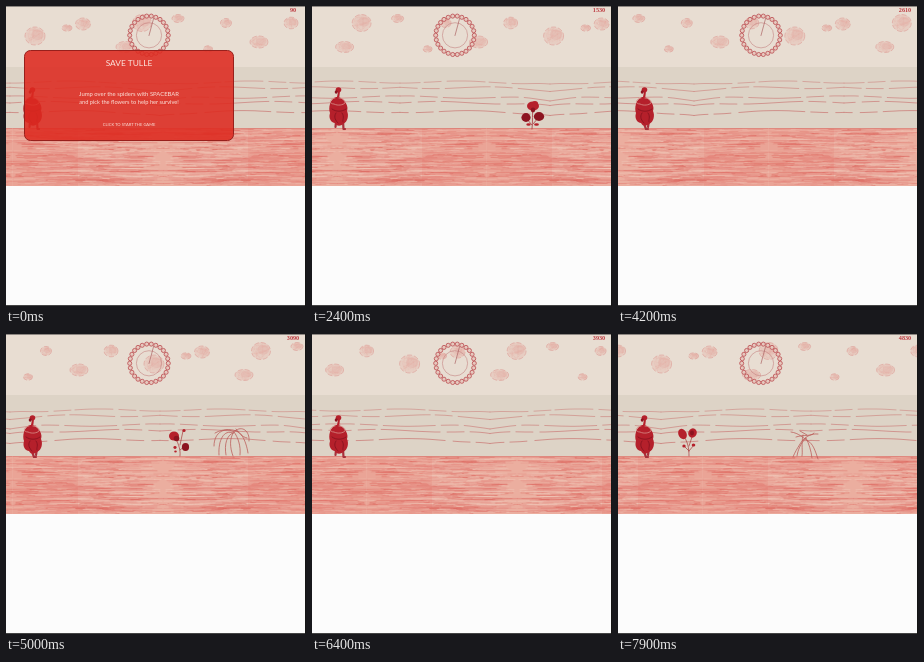
An HTML page that plays this animation: 300 by 300 pixels, repeating every 8000 ms.

```html
<!DOCTYPE html>
<html lang="en">
<head>
<meta charset="utf-8">
<title>Flower runner</title>
<style>
html, body { margin: 0; width: 100%; height: 100%; overflow: hidden; background: #fcfcfc; }
svg { display: block; width: 100vw; height: 100vh; }
.ink { fill: none; stroke-linecap: round; stroke-linejoin: round; }
.note { fill: #fbe3dc; font-family: Lato, "Open Sans", sans-serif; text-anchor: middle; }
</style>
</head>
<body>
<svg viewBox="0 0 300 300">
  <rect width="300" height="62" fill="#e8ddd2"/>
  <rect y="61" width="300" height="62" fill="#ddd3c6"/>
  <g id="clouds"></g>
  <g id="clock"></g>
  <g id="wires"></g>
  <g id="ground"></g>
  <g id="world"></g>
  <g id="woman"></g>
  <g id="panel">
    <rect x="18.5" y="44.5" width="209" height="90" rx="6" fill="#de2a20" fill-opacity=".87" stroke="#98201c"/>
    <g class="note">
      <text x="123" y="60" font-size="8.4">SAVE TULLE</text>
      <text x="123" y="90" font-size="5.9">Jump over the spiders with SPACEBAR</text>
      <text x="123" y="98" font-size="5.7">and pick the flowers to help her survive!</text>
      <text x="123" y="120" font-size="4.1">CLICK TO START THE GAME</text>
    </g>
  </g>
  <text id="score" x="287" y="6.4" font-size="6.2" font-weight="bold" text-anchor="middle" fill="#bd3a40" font-family="Liberation Serif, serif"></text>
  <rect y="180" width="300" height="120" fill="#fcfcfc"/>
  <path d="M0 .5H300" stroke="#8d8782"/>
  <path d="M0 299.5H300" stroke="#444"/>
  <path d="M299.5 0V300" stroke="#151515"/>
</svg>
<script>
const LOOP = 8000, STEP = 100, SPEED = 0.18;
const CLOUD_PERIOD = 299, TILE = 300;
const byId = id => document.getElementById(id);

let seed = 7;
const rand = (lo = 0, hi = 1) => {
  seed = (seed * 16807) % 2147483647;
  return lo + (hi - lo) * seed / 2147483647;
};
const ink = (d, color, width, extra = '') =>
  `<path class="ink" d="${d}" stroke="${color}" stroke-width="${width}" ${extra}/>`;
const blob = (x, y, rx, ry, fill, extra = '') =>
  `<ellipse cx="${x}" cy="${y}" rx="${rx}" ry="${ry}" fill="${fill}" ${extra}/>`;
const mirrored = (axis, half) =>
  `<g transform="translate(${axis})">${half}<g transform="scale(-1 1)">${half}</g></g>`;

// Repeats a strip so that it can scroll without a gap.
function fillStrip(id, markup, period) {
  const copies = [-1, 0, 1, 2].map(i => `<use href="#${id}Tile" x="${i * period}"/>`).join('');
  byId(id).innerHTML = `<defs><g id="${id}Tile">${markup}</g></defs>${copies}`;
}

function cloud([x, y, rx, ry]) {
  let scribble = '';
  for (let i = 0; i < 30; i++) {
    const a = rand(0, 6.28), r = rand(0.6, 1);
    scribble += `${i ? 'L' : 'M'}${(x + rx * r * Math.cos(a)).toFixed(1)} ${(y + ry * r * Math.sin(a)).toFixed(1)}`;
  }
  return blob(x, y, rx, ry, '#e6aaa2', 'fill-opacity=".32" stroke="#dd9d96" stroke-width=".6" stroke-dasharray="5 2"') +
    blob(x + rx * 0.25, y - ry * 0.15, rx * 0.6, ry * 0.6, '#df938c', 'opacity=".22"') +
    ink(scribble, '#e0a098', 0.4, 'opacity=".28"');
}

const clouds = [
  [29, 30, 10, 9], [61, 22, 5, 3.2], [77, 18, 7.5, 6], [119, 41, 9, 5.5], [136, 17, 9.5, 8.5],
  [172, 12.5, 6, 4], [202, 43, 4.5, 3.2], [220, 17, 5.5, 4.5], [253, 36, 9, 6], [285, 17, 7, 5.8]
];

// Wires are mirrored about one axis, where they sag.
function wires() {
  let half = '';
  [[76, 2], [81.5, 4], [91, 4], [96.5, 3], [105.5, 4]].forEach(([base, sag], n) => {
    let d = '';
    for (let x = 0; x <= 150; x += 5) {
      const y = base + sag * Math.exp(-x / 26) + 1.1 * Math.sin(x / 19 + n * 1.7) * Math.min(1, x / 30);
      d += `${x ? 'L' : 'M'}${x} ${y.toFixed(1)}`;
    }
    half += ink(d, '#cb7a76', 0.65 + 0.07 * n, `opacity=".8" stroke-dasharray="${38 + 7 * n} 6 17 ${4 + n}" stroke-dashoffset="${n * 13}"`);
  });
  return mirrored(154, half);
}

function ground() {
  const tones = ['#de6a62', '#e4837a', '#d95752', '#f2d3c2', '#f0c9b8', '#e6948a'];
  const strokes = tones.map(() => '');
  for (let i = 0; i < 620; i++) {
    const len = rand(6, 50), x = rand(0, 152 - len), y = rand(123, 179.5);
    strokes[i % tones.length] +=
      `M${x.toFixed(0)} ${y.toFixed(1)}q${(len / 2).toFixed(0)} ${rand(-1, 1).toFixed(1)} ${len.toFixed(0)} ${rand(-0.6, 0.6).toFixed(1)}`;
  }
  const half = '<rect y="122" width="150.5" height="58" fill="#ebae9f"/>' +
    strokes.map((d, i) => ink(d, tones[i], 0.5, 'opacity=".8"')).join('') +
    '<rect x="85" y="122" width="65" height="58" fill="#dc4f48" opacity=".1"/>' +
    ink('M0 122.5H150', '#dc8078', 0.7);
  return mirrored(157, half);
}

function clock() {
  let beads = '';
  for (let i = 0; i < 26; i++) {
    const a = i * Math.PI / 13;
    beads += `<circle cx="${(143 + 19.3 * Math.cos(a)).toFixed(1)}" cy="${(29.3 + 19.3 * Math.sin(a)).toFixed(1)}" r="2.05"/>`;
  }
  return `<g fill="#e6c8be" stroke="#bd5256" stroke-width=".85">${beads}</g>` +
    '<circle cx="143" cy="29.3" r="12.6" fill="none" stroke="#c58482" stroke-width=".6"/>' +
    ink('M143 29.5L147.6 12.5', '#a85a5c', 0.65);
}

const RED = '#b5202b', DARK = '#8c1420';
const flowers = [
  ink('M0 123C1 115 0 108 1 100M0 119L-6 112M1 118L7 111', '#a83a40', 0.8) +
    blob(1, 100, 6, 4.6, RED) + blob(3, 97.5, 3, 2.6, RED) + blob(-6, 111.5, 4.6, 4.4, DARK) +
    blob(7, 110.5, 5.2, 4.4, DARK) + blob(1, 104, 2.2, 2.4, DARK) +
    blob(-3.5, 118.5, 2.2, 1.3, RED) + blob(4.5, 118.5, 2.4, 1.3, RED),
  ink('M0 122C1 114-3 108-5 102M0 116L5 112M0 111L3 97', '#a83a3c', 0.7) +
    blob(-6, 102, 5, 4.6, RED) + blob(-3.5, 104.5, 2.8, 2.8, DARK) + blob(5.5, 113, 3.6, 4, DARK) +
    blob(4, 96.5, 1.6, 1.6, RED) + blob(-5, 113.5, 1.6, 1.4, RED) + blob(-4.5, 117.5, 1.3, 1, RED),
  ink('M1 122C1 114 0 108-5 101M1 112L5 100M1 117L-4 112M1 117L6 111', '#a83a3c', 0.7) +
    blob(-5.5, 100, 4, 5.5, RED, 'transform="rotate(-28 -5.5 100)"') +
    blob(4.5, 99, 4.2, 4.8, RED, 'transform="rotate(25 4.5 99)"') +
    blob(4, 99, 2, 2.4, DARK) + blob(-4, 112, 1.7, 1.5, RED) + blob(5.5, 111, 1.8, 1.5, RED)
];
const spiders = [
  'M2 98C-6 93-18 97-18 112M1 99C-8 95-14 106-13 121M1 99C-5 101-8 110-6 121M2 98C-3 104-2 114 1 122' +
    'M2 98C6 103 9 112 8 121M2 97C8 95 14 106 16 119M3 97C10 91 18 97 17 107M-17 99C-8 94 2 95 6 98M4 95C7 99 10 103 15 104',
  'M-14 98C-6 99-2 104 3 107S10 116 13 125M13 100C4 99-2 105-5 110S-10 118-12 123M-9 103C0 100 6 103 9 99' +
    'M1 104C-5 110-7 116-8 122M1 104C4 110 6 116 7 124M-2 101C-4 111-2 117-3 122M2 101L-5 97'
].map(d => ink(d, '#ba5856', 0.75));
const legs = ['M24 115L23.5 121M31 115L31.5 123H33', 'M25 115L28 123H30M31 115L30 121'];

function womanMarkup() {
  return legs.map(d => ink(d, '#a8303a', 2.2)).join('') +
    ink('M26.5 84C28 88 25.5 90 25.5 95', RED, 2.2) +
    blob(26.5, 83.8, 2.8, 2.5, RED) + blob(24.2, 86, 1.5, 1.8, DARK) +
    `<path d="M24 91C18 93 16 102 18 107C16 113 20 117 23 117C25 121 29 120 31 118C36 116 37 109 35 105C37 100 33 94 27 91Z" fill="${RED}"/>` +
    ink('M20 103C24 106 30 106 34 103M24 107C21 111 24 115 26 117M30 107C33 111 30 114 31 116', DARK, 1) +
    ink('M23 92C17 93 17 98 22 98C26 100 31 99 33 97C34 94 30 92 27 92', '#d99089', 0.8);
}

// Each thing sits at a fixed place on the scrolling track and vanishes at its own left limit.
const things = [
  ...[652, 1074, 1492].map((x, i) => ({ x, limit: 27, art: flowers[i] })),
  ...[1126, 1609].map((x, i) => ({ x, limit: -30, art: spiders[i] }))
];
for (const thing of things) {
  thing.node = document.createElementNS('http://www.w3.org/2000/svg', 'g');
  thing.node.innerHTML = thing.art;
  byId('world').append(thing.node);
}

fillStrip('clouds', clouds.map(cloud).join(''), CLOUD_PERIOD);
fillStrip('wires', wires(), TILE);
fillStrip('ground', ground(), TILE);
byId('clock').innerHTML = clock();
byId('woman').innerHTML = womanMarkup();

const move = (node, x, y = 0) => node.setAttribute('transform', `translate(${x.toFixed(2)} ${y.toFixed(2)})`);
const show = (node, visible) => { node.style.display = visible ? '' : 'none'; };

function jumpHeight(t) {
  const p = (t - 5830) / 550;
  return p > 0 && p < 1 ? 4 * 36 * p * (1 - p) : 0;
}

function render(t) {
  const run = t * SPEED, pose = Math.floor(t / 200) % 2;
  move(byId('clouds'), -(run / 5 % CLOUD_PERIOD));
  move(byId('wires'), -(run / 2 % TILE));
  move(byId('ground'), -(run % TILE));
  move(byId('panel'), -run);
  move(byId('woman'), 0, -jumpHeight(t));
  legs.forEach((_, i) => show(byId('woman').children[i], i === pose));
  for (const { x, limit, node } of things) {
    const at = x - run;
    move(node, at);
    show(node, at > limit && at < 330);
  }
  byId('score').textContent = Math.round(90 + t * 0.6);
}

const start = performance.now();
function tick() {
  const t = (performance.now() - start) % LOOP;
  render(Math.floor(t / STEP) * STEP);
  requestAnimationFrame(tick);
}
tick();
</script>
</body>
</html>
```
